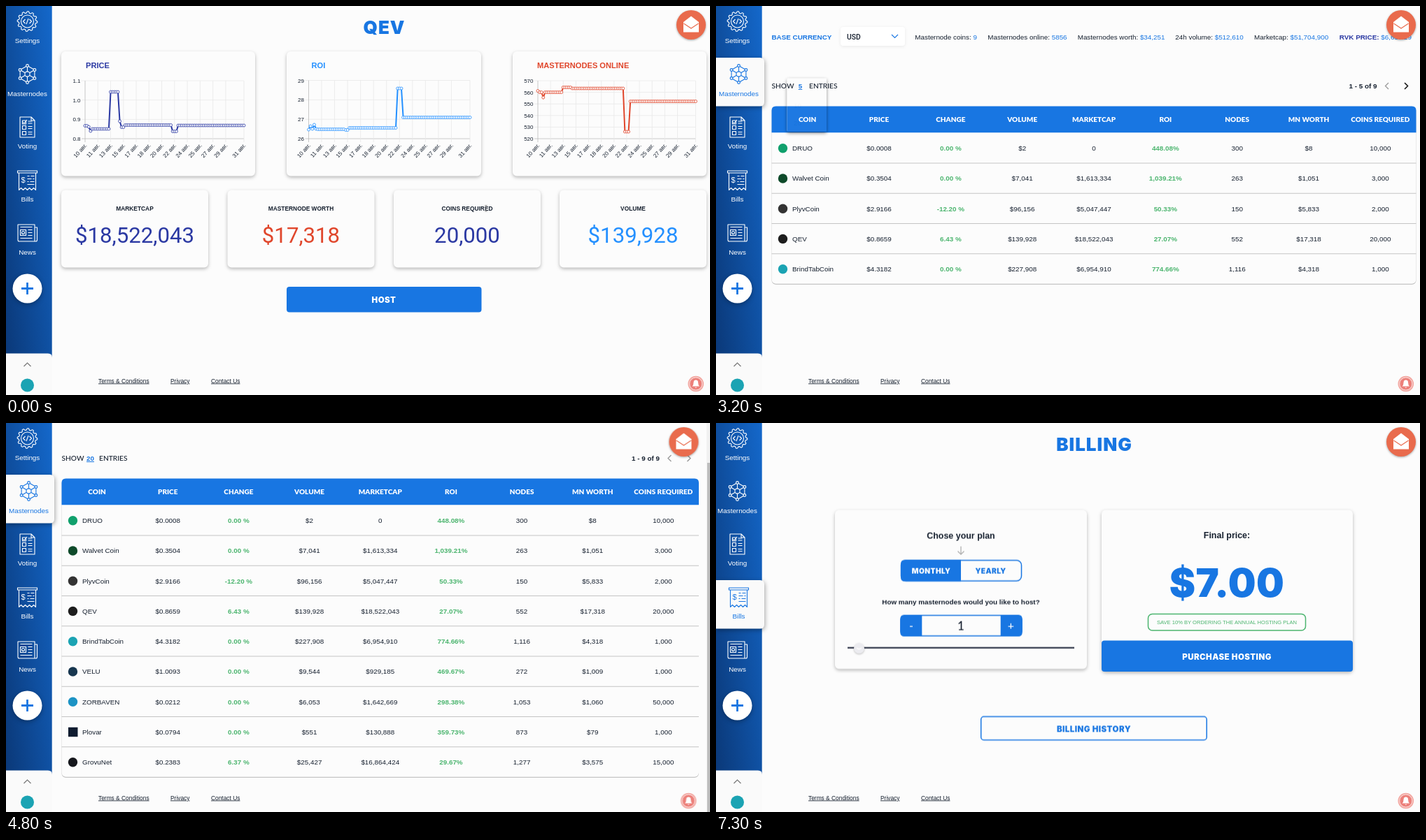
Animation of 1006x557 px, one loop 8000 ms. Source, as an HTML page:

```html
<!DOCTYPE html>
<html lang="en">
<head>
<meta charset="utf-8">
<title>Node hosting dashboard</title>
<style>
html, body { margin: 0; width: 100%; height: 100%; overflow: hidden; background: #fcfcfc; }
svg { display: block; width: 1006px; height: 557px; font-family: "Liberation Sans", Arial, sans-serif; }
text { white-space: pre; }
.m { text-anchor: middle; }
.e { text-anchor: end; }
.b { font-weight: 700; }
.u { text-decoration: underline; }
.heavy { font-family: Inter, sans-serif; font-weight: 900; letter-spacing: .45px; }
.lato { font-family: Lato, sans-serif; font-weight: 500; }
.head { font: 900 10px Lato, sans-serif; }
.num { font: 400 31.2px Roboto, sans-serif; }
.unit { font: 500 10.3px Roboto, sans-serif; }
.title { font-size: 26px; letter-spacing: 1px; }
.s8 { font-size: 8px; } .s84 { font-size: 8.4px; } .s98 { font-size: 9.85px; }
.s10 { font-size: 10.2px; } .s11 { font-size: 11.1px; } .s115 { font-size: 11.5px; } .s124 { font-size: 12.45px; }
.card { fill: #fcfcfc; filter: drop-shadow(0 2px 2.5px rgba(0,0,0,.28)); }
.flat { filter: drop-shadow(0 1px .6px rgba(0,0,0,.28)); }
.faint { filter: drop-shadow(0 1px 2px rgba(0,0,0,.08)); }
.ico { fill: none; stroke: currentColor; stroke-width: 1.1; stroke-linejoin: round; }
.line { fill: none; stroke-width: 1.5; }

[class^="t-"] { animation: 8s step-end infinite; }
.t-detail { animation-name: detail; }
.t-list { animation-name: list; }
.t-full { animation-name: full; }
.t-scroll { animation-name: scroll; }
.t-thumb { animation-name: thumb; }
.t-foot { animation-name: foot; }
.t-float { animation-name: float; }
.t-shade { animation-name: shade; }
.t-menu { animation-name: menu; }
.t-pick { animation-name: pick; }
.t-nodes { animation-name: nodes; }
.t-bills { animation-name: bills; }
.t-billing { animation-name: billing; }
.t-plan { animation-name: plan; }
.t-history { animation-name: history; }
.t-final { animation-name: final; }
.t-load1 { animation-name: load1; }
.t-load2 { animation-name: load2; }
.t-wide { animation-name: wide; }

@keyframes detail { 0% { opacity: 1 } 21.25%, 100% { opacity: 0 } }
@keyframes list { 0% { opacity: 0 } 21.25% { opacity: .4 } 22.5% { opacity: .8 } 23.75% { opacity: 1 } 48.75%, 100% { opacity: 0 } }
@keyframes full { 0% { opacity: 0 } 48.75% { opacity: 1 } 78.75%, 100% { opacity: 0 } }
@keyframes scroll { 0% { transform: none } 57.5% { transform: translateY(-20px) } 58.75% { transform: translateY(-50px) } 60%, 100% { transform: translateY(-64px) } }
@keyframes thumb { 0% { transform: none } 57.5% { transform: translateY(18px) } 58.75% { transform: translateY(45px) } 60%, 100% { transform: translateY(57px) } }
@keyframes foot { 0% { opacity: 1 } 48.75% { opacity: 0 } 78.75%, 100% { opacity: 1 } }
@keyframes float { 0% { transform: none } 48.75% { transform: translateX(-10.5px) } 78.75%, 100% { transform: none } }
@keyframes shade { 0% { opacity: 0 } 38.75% { opacity: .4 } 40% { opacity: .9 } 41.25% { opacity: 1 } 48.75% { opacity: .5 } 50%, 100% { opacity: 0 } }
@keyframes menu { 0% { opacity: 0 } 40% { opacity: .03 } 41.25% { opacity: .6 } 42.5% { opacity: 1 } 48.75% { opacity: .5 } 50%, 100% { opacity: 0 } }
@keyframes pick { 0% { transform: none } 47.5%, 100% { transform: translateY(51px) } }
@keyframes nodes { 0% { opacity: 0 } 17.5% { opacity: 1 } 78.75%, 100% { opacity: 0 } }
@keyframes bills { 0% { opacity: 0 } 73.75%, 100% { opacity: 1 } }
@keyframes billing { 0% { opacity: 0 } 78.75% { opacity: .4 } 80% { opacity: .8 } 81.25%, 100% { opacity: 1 } }
@keyframes plan { 0% { transform: none } 82.5%, 100% { transform: translate(-190px, -1.4px) } }
@keyframes history { 0% { transform: none } 82.5%, 100% { transform: translateY(1.4px) } }
@keyframes final { 0% { opacity: 0 } 82.5%, 100% { opacity: 1 } }
@keyframes load1 { 0% { opacity: 0 } 21.25% { opacity: 1 } 33.75% { opacity: .66 } 35% { opacity: .33 } 36.25%, 100% { opacity: 0 } }
@keyframes load2 { 0% { opacity: 0 } 78.75% { opacity: 1 } 88.75% { opacity: .66 } 90% { opacity: .33 } 91.25%, 100% { opacity: 0 } }
@keyframes wide { 0% { opacity: 0 } 78.75% { opacity: 1 } 82.5%, 100% { opacity: 0 } }
</style>
</head>
<body>
<svg id="stage" viewBox="0 0 1006 557"></svg>
<script>
const BLUE = '#1876e2', INDIGO = '#2b39a3', SKY = '#2490ff', RED = '#e0462b', INK = '#16202f', GREEN = '#4cb56f';

const text = (x, y, s, cls = '', fill = INK, size = '') =>
  `<text x="${x}" y="${y}" class="${cls}" fill="${fill}"${size && ` style="font-size:${size}px"`}>${s}</text>`;
const rect = (x, y, w, h, r, fill, more = '') =>
  `<rect x="${x}" y="${y}" width="${w}" height="${h}" rx="${r}" fill="${fill}" ${more}/>`;
const path = (d, stroke, w = 1) => `<path d="${d}" fill="none" stroke="${stroke}" stroke-width="${w}"/>`;
const dot = (x, y, r, fill, more = '') => `<circle cx="${x}" cy="${y}" r="${r}" fill="${fill}" ${more}/>`;
const card = (x, y, w, h, cls = 'card') => rect(x, y, w, h, 6, '#fcfcfc', `class="${cls}"`);
const group = (cls, ...parts) => `<g class="${cls}">${parts.join('')}</g>`;
const range = n => [...Array(n).keys()];
const polar = (r, a) => [(r * Math.cos(a)).toFixed(2), (r * Math.sin(a)).toFixed(2)];

// Sidebar
const gear = range(48).map(k => polar(k % 4 < 2 ? 14.3 : 12, k * Math.PI / 24)).join(' ');
const hex = range(6).map(k => polar(12, Math.PI / 2 + k * Math.PI / 3));
const icons = {
  Settings: `<polygon points="${gear}"/><circle r="9"/><path d="M-3-3l-3 3 3 3M3-3l3 3-3 3M1.5-4l-3 8"/>`,
  Masternodes: `<polygon points="${hex.join(' ')}"/>` + hex.map(p => `<path d="M0 0L${p}"/>`).join('') +
    hex.map(([x, y]) => dot(x, y, 1.9, 'var(--back)')).join('') + dot(0, 0, 3.6, 'var(--back)'),
  Voting: '<path d="M-10.5-14.5h16l5 5v24h-21zM5.5-14.5v5h5"/>' +
    [-9.5, -2, 6].map(y => `<path d="M-7 ${y}h5v5h-5zM1 ${y + 1}h6M1 ${y + 4}h6"/>`).join('') + '<path d="M-6-7l1.5 1.5 4-5"/>',
  Bills: '<path d="M-14-12.5h28v3h-28zM-12-9.5V15l3-3 3 3 3-3 3 3 3-3 3 3 3-3 3 3V-9.5M0-5h3M5-5h5M0-1h6M8-1h2M0 3h2M4 3h6M0 7h10"/>' +
    '<text x="-9" y="4" font-size="11" fill="currentColor" stroke="none">$</text>',
  News: '<path d="M-13.5-12h24v24h-22q-2 0-2-2zM10.5-8h3.5v18q0 2-2 2h-2M-10-8.5h17M-10-4.5h8v8h-8zM1-4.5h6M1-.5h6M1 3.5h6M-10 7.5h17"/><circle cx="-6" cy="-.5" r="2"/>'
};
const tops = { Settings: 22, Masternodes: 97.5, Voting: 173.5, Bills: 248.5, News: 325 };
const labels = { Settings: 53, Masternodes: 128.5, Voting: 204, Bills: 279.5, News: 355.5 };
const item = (name, x, color, back) =>
  `<g class="ico" style="color:${color};--back:${back}" transform="translate(${x} ${tops[name]})">${icons[name]}</g>` +
  text(x, labels[name], name, 'm s98', color);
const active = (name, cls) => group(cls,
  `<path class="card" style="fill:#fafafa;filter:drop-shadow(1px 2px 3px rgba(0,0,0,.35))" d="M0 ${tops[name] - 23.5}h63q6 0 6 6v57.5q0 6-6 6H0z"/>`,
  item(name, 32.5, BLUE, '#fafafa'));
const sidebar = rect(0, 0, 65.7, 557, 0, 'url(#side)') +
  Object.keys(icons).map(n => item(n, 30.5, '#fff', '#1056ad')).join('') +
  dot(30.5, 404.5, 21, '#fff', 'style="filter:drop-shadow(0 2px 3px rgba(0,0,0,.3))"') +
  path('M22 404.5h17M30.5 396v17', BLUE, 2.8) +
  '<path d="M0 497.5h60q6 0 6 6V557H0z" fill="#fafafa"/>' +
  path('M25.5 516l5-5 5 5', '#777', 1.2) + dot(30.5, 543, 9.5, '#1ba3b3');

// Coin page
const days = [10, 11, 13, 15, 17, 18, 20, 22, 24, 25, 27, 29, 31];
function chart(x, w, top, scale, runs, color) {
  const bottom = 190, step = w / 87;
  const ys = runs.flatMap(([n, y]) => Array(n).fill(y));
  const pts = ys.map((y, i) => [+(x + i * step).toFixed(2), y]);
  let out = scale.map((s, i) => {
    const y = top + (bottom - top) * i / (scale.length - 1);
    return path(`M${x - 5} ${y}H${x + w}`, i == scale.length - 1 ? '#bbb' : '#e9e9e9', .8) + text(x - 6.5, y + 3, s, 'e s8');
  }).join('');
  days.forEach((d, i) => {
    const tx = x + (i < 12 ? i * 7 : 87) * step;
    out += path(`M${tx} ${top}V${bottom + 5}`, i ? '#e9e9e9' : '#bbb', .8) +
      `<text class="e s8" fill="${INK}" transform="translate(${tx + 3} 200) rotate(-48)">${d} авг.</text>`;
  });
  return out + `<polyline class="line" style="stroke-width:2" stroke="${color}" points="${pts.join(' ')}"/>` +
    pts.map(p => dot(p[0], p[1], 2, '#fff', `stroke="${color}" stroke-width=".8"`)).join('');
}
const stat = (x, label, value, color) =>
  card(x, 263.5, 210, 111) + text(x + 105, 293, label, 'm b s84') + text(x + 105, 339, value, 'm num', color);
const detail = group('t-detail',
  text(540.5, 40, 'QEV', 'm heavy title', BLUE),
  card(79, 65, 277, 178.5), text(114, 89, 'PRICE', 'b s11', INDIGO),
  chart(113, 227, 107, ['1.1', '1.0', '0.9', '0.8'],
    [[2, 171.5], [1, 173], [1, 179], [10, 176], [5, 123], [1, 165], [2, 173.5], [26, 170.5], [3, 179.5], [37, 171]], INDIGO),
  card(401, 65, 278, 178.5), text(436.5, 88.5, 'ROI', 'b s11', SKY),
  chart(432.5, 230.5, 106.5, [29, 28, 27, 26],
    [[1, 177], [1, 172], [1, 176], [1, 170], [1, 176], [15, 176.5], [2, 177.5], [26, 174.5], [3, 118], [37, 159.5]], SKY),
  card(724, 65, 277, 178.5), text(759, 89, 'MASTERNODES ONLINE', 'b s11', RED),
  chart(760, 225.5, 107, [570, 560, 550, 540, 530, 520],
    [[1, 121.5], [2, 123.5], [1, 131], [10, 123.5], [5, 116.5], [29, 118], [3, 180], [37, 136.5]], RED),
  stat(79, 'MARKETCAP', '$18,522,043', INDIGO), stat(316.5, 'MASTERNODE WORTH', '$17,318', RED),
  stat(554, 'COINS REQUIRED', '20,000', INDIGO), stat(791, 'VOLUME', '$139,928', SKY),
  path('M684 285.5h4M686 285.5v8.5M684 294h4', '#777', .7),
  rect(401, 402, 278.5, 36.5, 4, BLUE), text(540, 425, 'HOST', 'm heavy s115', '#fff'));

// Coin list
const heads = ['COIN', 'PRICE', 'CHANGE', 'VOLUME', 'MARKETCAP', 'ROI', 'NODES', 'MN WORTH', 'COINS REQUIRED'];
const coins = `DRUO|$0.0008|0.00 %|$2|0|448.08%|300|$8|10,000|#10a06c
Walvet Coin|$0.3504|0.00 %|$7,041|$1,613,334|1,039.21%|263|$1,051|3,000|#0e4a2a
PlyvCoin|$2.9166|-12.20 %|$96,156|$5,047,447|50.33%|150|$5,833|2,000|#333
QEV|$0.8659|6.43 %|$139,928|$18,522,043|27.07%|552|$17,318|20,000|#1d1d1d
BrindTabCoin|$4.3182|0.00 %|$227,908|$6,954,910|774.66%|1,116|$4,318|1,000|#1ba3b3
VELU|$1.0093|0.00 %|$9,544|$929,185|469.67%|272|$1,009|1,000|#17364f
ZORBAVEN|$0.0212|0.00 %|$6,053|$1,642,669|298.38%|1,053|$1,060|50,000|#1c93c4
Plovar|$0.0794|0.00 %|$551|$130,888|359.73%|873|$79|1,000|#0f1c30
GrovuNet|$0.2383|6.37 %|$25,427|$16,864,424|29.67%|1,277|$3,575|15,000|#15171c`.split('\n').map(r => r.split('|'));
const facts = [[284.3, 'Masternode coins:', '9'], [388.3, 'Masternodes online:', '5856'], [516.7, 'Masternodes worth:', '$34,251'],
  [656.3, '24h volume:', '$512,610'], [769, 'Marketcap:', '$51,704,900'], [890.8, 'RVK PRICE:', '$6,650.29']];

function list(count, per, inset) {
  const w = 921 - inset, col = w / 9, pitch = 43.25, right = 79.5 + w;
  let out = text(79.5, 47.5, 'BASE CURRENCY', 'b s98', BLUE) + rect(178, 30, 92, 27, 4, '#fff', 'class="faint"') +
    text(187, 47.5, 'USD', 'unit') + path('M251 41l4.5 4.5 4.5-4.5', BLUE, 1.1);
  facts.forEach(([x, name, value], i) => {
    const last = i == 5;
    out += text(x - (inset ? (x - 180) * .015 : 0), 47.5,
      `<tspan class="${last ? 'b' : ''}">${name}</tspan><tspan fill="${BLUE}"> ${value}</tspan>`, 's98', last ? INDIGO : INK);
  });
  out += text(79.5, 118, 'SHOW', 'lato s10') + text(120.5, 118, per, 'm b u s98', BLUE) + text(133, 118, 'ENTRIES', 'lato s10') +
    text(944.5 - inset, 118, `1 - ${count} of 9`, 'e b s98') +
    path(`M${961 - inset} 110l-4.5 4.5 4.5 4.5`, '#999', 1.3) +
    path(`M${984 - inset} 110l4.5 4.5-4.5 4.5`, inset ? '#999' : '#111', 1.5) +
    card(79.5, 143.5, w, 38 + count * pitch, 'flat') +
    `<path d="M79.5 181.3V149.5q0-6 6-6H${right - 6}q6 0 6 6v31.8z" fill="${BLUE}"/>`;
  heads.forEach((h, k) => out += text(79.5 + col * (k + .5), 165.5, h, 'm head', '#fff'));
  coins.slice(0, count).forEach((c, i) => {
    const y = 203.5 + i * pitch;
    out += (c[0] == 'Plovar' ? rect(89, y - 6.5, 13.5, 13.5, 0, c[9]) : dot(95.5, y + .3, 6.7, c[9])) + text(109, y + 3.5, c[0], 's98');
    for (let k = 1; k < 9; k++) {
      const green = k == 2 || k == 5;
      out += text(79.5 + col * (k + .5), y + 3.5, c[k], 'm s98' + (green ? ' b' : ''), green ? GREEN : INK);
    }
    if (i < count - 1) out += path(`M79.5 ${y + 21.5}H${right}`, '#c4c4c4');
  });
  return out;
}
const footer = y => text(132, y, 'Terms &amp; Conditions', 'u s84') + text(235, y, 'Privacy', 'u s84') + text(293, y, 'Contact Us', 'u s84');

// The shadow comes in before the panel, so it is clipped to the outside
const panel = more => rect(101.5, 103.5, 56.5, 76.5, 2, '#fff', more);
const menu = group('t-shade', '<g clip-path="url(#outside)">', panel('style="filter:drop-shadow(0 2px 2.5px rgba(0,0,0,.5))"'), '</g>') +
  group('t-menu', panel(), group('t-pick', rect(101.5, 103.5, 56.5, 25.5, 2, '#ebebeb')),
    [5, 10, 20].map((n, i) => text(111, 120 + i * 25.5, n, 's98')).join(''));

// Billing page
const half = (x, y, w, h) => `<path d="M${x + w} ${y}H${x + 6}q-6 0-6 6v${h - 12}q0 6 6 6H${x + w}z" fill="${BLUE}"/>`;
const frame = (x, y, w, h, r, c = BLUE) => rect(x, y, w, h, r, 'none', `stroke="${c}" stroke-width="1.5"`);
const plan = group('t-plan', card(360, 126, 360, 227.5),
  text(540, 166.5, 'Chose your plan', 'm b s124'), path('M540 178v11.5M535.5 185l4.5 4.5 4.5-4.5', '#aaa', 1.2),
  frame(454.5, 198, 172, 29.5, 7), half(454, 197.3, 86, 31),
  text(497.5, 217, 'MONTHLY', 'm heavy', '#fff', 10.2),
  text(582.5, 217, 'YEARLY', 'm heavy', BLUE, 10.2),
  text(540, 261, 'How many masternodes would you like to host?', 'm b s98'),
  frame(454, 276.7, 173, 29.5, 7), half(453.3, 276, 31, 31),
  `<g transform="translate(1081 0) scale(-1 1)">${half(453.3, 276, 31, 31)}</g>`,
  text(469, 297, '-', 'm lato', '#fff', 16), text(611.5, 297, '+', 'm lato', '#fff', 16),
  text(540, 297.5, '1', 'm lato', INK, 17),
  path('M378 323.3H702', '#1d2438', 2),
  dot(394.5, 324, 7.5, '#ececf0', 'style="filter:drop-shadow(0 1px 1px rgba(0,0,0,.25))"'), path('M391 323.5q3.5 3 7 0', '#fff', 1.5));
const final = group('t-final', card(551, 124.5, 359, 231.5), text(730, 165, 'Final price:', 'm b s124'),
  text(730, 248.5, '$7.00', 'm heavy', BLUE, 56),
  frame(617.5, 273.5, 225, 23.5, 6, GREEN),
  text(730, 288, 'SAVE 10% BY ORDERING THE ANNUAL HOSTING PLAN', 'm', GREEN, 7.6),
  rect(551, 311.5, 359, 44.5, 4, BLUE), text(730, 339, 'PURCHASE HOSTING', 'm heavy s115', '#fff'));
const history = group('t-history', frame(378.7, 419, 322.5, 33.5, 4),
  text(540, 440.5, 'BILLING HISTORY', 'm heavy s115', BLUE));
const billing = group('t-billing', text(540.5, 40, 'BILLING', 'm heavy title', BLUE), plan, final, history);

const float = group('t-float',
  dot(979, 27, 21, '#e96b4d', 'style="filter:drop-shadow(0 1.5px 1.5px rgba(0,0,0,.35))"'),
  '<path d="M968 23l11-8.5 11 8.5v14.5h-22z" fill="#fff"/>', path('M968.5 25l10.5 7 10.5-7', '#e96b4d', 1.1),
  dot(985.8, 541, 11.3, '#f3aaa4'), dot(985.8, 541, 9, '#ec807a', 'stroke="#fff" stroke-width=".7"'),
  '<path d="M980.5 544.5q2-1.5 2-5 0-4 3.3-4t3.3 4q0 3.5 2 5zM984.3 545.8h3q-1.5 2-3 0z" fill="#fff"/>');
const status = (w, s) => `<path d="M0 551.5h${w - 2}q2 0 2 2V557H0z" fill="#dedede"/>` + text(2, 563, s, 's84', '#555');

document.getElementById('stage').innerHTML =
  '<defs><linearGradient id="side" x1="0" y1="1" x2="1" y2="0"><stop stop-color="#0a3674"/><stop offset="1" stop-color="#1468cb"/></linearGradient>' +
  '<clipPath id="outside"><path clip-rule="evenodd" d="M90 95h80v95h-80zM101.5 103.5h56.5v76.5h-56.5z"/></clipPath></defs>' +
  rect(0, 0, 1006, 557, 0, '#fcfcfc') + detail + group('t-list', list(5, 5, 0)) +
  group('t-full', group('t-scroll', list(9, 20, 10.5), footer(603.5)),
    rect(1001, 0, 5, 557, 0, '#f1f1f1'), group('t-thumb', rect(1002, 0, 4, 500, 0, '#bdbdbd'))) +
  menu + billing + group('t-foot', footer(539.5)) + sidebar +
  active('Masternodes', 't-nodes') + active('Bills', 't-bills') + float +
  group('t-load1', status(151, 'Opening the list of masternodes')) +
  group('t-load2', group('t-wide', status(333, '')), status(125, 'Opening the billing page'));
</script>
</body>
</html>
```
